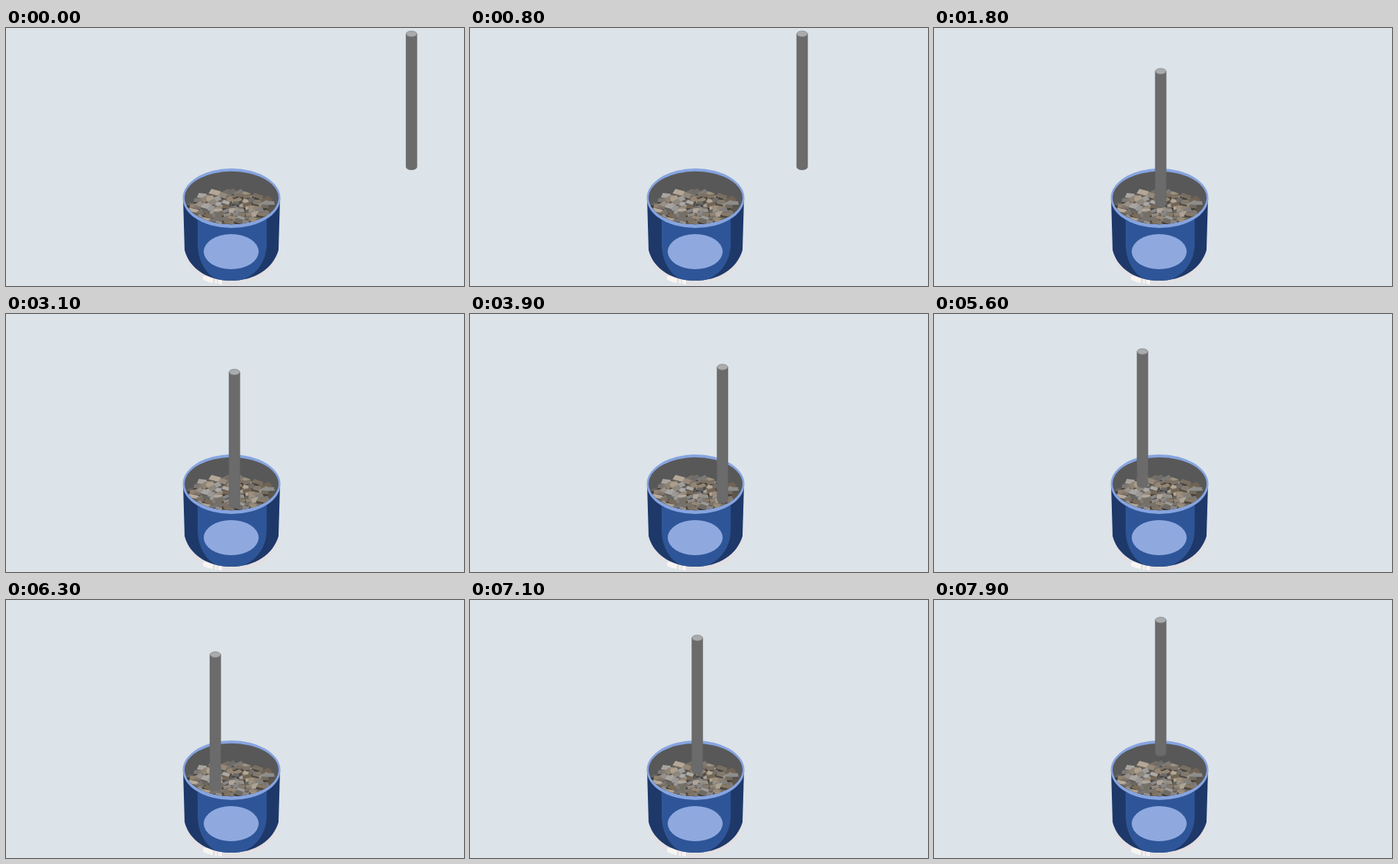
Write an HTML page that moves like this. It is 600 px wide and 338 px high and loops after 8 s.

```html
<!DOCTYPE html>
<html lang="en">
<head>
<meta charset="utf-8">
<title>Stirring rod</title>
<style>
  html, body { margin: 0; width: 100%; height: 100%; overflow: hidden; background: #dce3e9; }
  svg { display: block; width: 600px; height: 338px; }
</style>
</head>
<body>
<svg viewBox="0 0 600 338">
  <defs>
    <clipPath id="mouth"><ellipse cx="295.500" cy="222.500" rx="61.500" ry="34.700"/></clipPath>
    <clipPath id="wall"><path d="M232 223L234 291C240 315 264 331 295 331S350 315 357 291L359 223Z"/></clipPath>
  </defs>

  <path d="M236 298C238 322 266 337 293 337S353 325 357 298Z" fill="#e2e0e3"/>
  <path d="M258 325h13v9q-7-1-13-4zM274 328h2v7h-2zM278 328h5v8l-5-1z" fill="#f7f4f2"/>

  <g clip-path="url(#wall)">
    <rect x="230" y="220" width="132" height="114" fill="#1e3869"/>
    <path d="M251 240V285C252 308 264 326 282 332H302C326 327 341.500 307 341.500 283V240Z" fill="#2e5598"/>
  </g>
  <ellipse cx="295" cy="293" rx="36" ry="23" fill="#8fa9df"/>

  <ellipse cx="295.500" cy="223" rx="64" ry="39" fill="#86a4df"/>
  <ellipse cx="295.500" cy="222.500" rx="61.500" ry="34.700" fill="#585859"/>
  <g id="stones" clip-path="url(#mouth)">
    <ellipse cx="296" cy="237" rx="56" ry="21" fill="#5f574b"/>
  </g>

  <g id="rod">
    <path d="M-7.200 4.300V178.500A7.200 4 0 0 0 7.200 178.500V4.300Z" fill="#6b6b6c" stroke="#626263" stroke-width=".4"/>
    <ellipse cy="4.300" rx="7" ry="3.800" fill="#a9abac" stroke="#77797a" stroke-width=".6"/>
  </g>
</svg>
<script>
const LOOP = 8000, STEP = 100;
const stones = document.getElementById('stones');
const rod = document.getElementById('rod');

let seed = 41;
const rand = (a, b) => {
  seed = (seed * 16807) % 2147483647;
  return a + (b - a) * seed / 2147483647;
};

function polygon(points, fill) {
  const p = document.createElementNS('http://www.w3.org/2000/svg', 'polygon');
  p.setAttribute('points', points.map(q => q.map(v => v.toFixed(1)).join()).join(' '));
  p.setAttribute('fill', fill);
  stones.append(p);
}

// Each stone is a tilted slab: a lit top and a dark front, laid back to front.
function stone(x, y) {
  const w = rand(4, 7), h = rand(2, 3.8), tilt = rand(-.8, .8), depth = rand(2, 4);
  const tone = rand(98, 172), warm = rand(-1, 15);
  const shade = k => `rgb(${[warm, 0, -warm * 1.3].map(d => Math.round((tone + d) * k))})`;
  const at = (u, v) => [x + u * w - v * h * tilt, y + v * h + u * w * tilt * .6];
  const [a, b, c, d] = [at(-.9, -.8), at(.8, -1), at(1, .7), at(-1, .9)];
  const low = p => [p[0], p[1] + depth];
  polygon([d, c, low(c), low(d)], shade(.58));
  polygon([a, b, c, d], shade(1));
}

for (let y = 216; y < 259; y += 4.8) {
  const half = 53 * Math.sqrt(Math.max(0, 1 - ((y - 237) / 22.5) ** 2));
  for (let x = 296 - half; x <= 296 + half; x += 9) stone(x + rand(-3, 3), y + rand(-2, 2));
}

const clamp = u => Math.min(1, Math.max(0, u));
const ease = (t, from, to, p) => {
  const u = clamp((t - from) / (to - from));
  return u < .5 ? .5 * (2 * u) ** p : 1 - .5 * (2 - 2 * u) ** p;
};

// Time, x and top of the rod while it stirs and leaves.
const path = [
  [2100, 297, 52.5], [2500, 297, 60], [3000, 297, 71], [3500, 314, 71],
  [3900, 330.8, 65.3], [4150, 344, 60], [4400, 345, 52], [4750, 317, 46],
  [4900, 312.8, 45.7], [5300, 293, 43.5], [5700, 267, 46.5], [6000, 254, 57],
  [6300, 274.2, 67.3], [6600, 290, 67], [6800, 297, 66], [7550, 297, 22], [8000, 297, 22]
];

// Cubic Hermite curve through the path with tangents from the neighbours.
function along(t) {
  let i = 0;
  while (i < path.length - 2 && path[i + 1][0] <= t) i++;
  const a = path[i], b = path[i + 1], span = b[0] - a[0], u = (t - a[0]) / span;
  const slope = (j, k) => {
    if (j === 0 || j >= path.length - 2) return 0;
    const p = path[j - 1], q = path[j + 1];
    return (q[k] - p[k]) / (q[0] - p[0]);
  };
  return [1, 2].map(k =>
    a[k] + (b[k] - a[k]) * u * u * (3 - 2 * u) +
    span * u * (1 - u) * (slope(i, k) * (1 - u) - slope(i + 1, k) * u));
}

function pose(t) {
  if (t >= 2100) return along(t);
  return [531.2 - 234.2 * ease(t, 55, 1700, 2), 3.4 + 49.1 * ease(t, 1000, 1800, 2)];
}

const start = performance.now();
function draw(now) {
  const t = Math.floor(Math.max(0, now - start) % LOOP / STEP) * STEP;
  const [x, y] = pose(t);
  rod.setAttribute('transform', `translate(${x.toFixed(2)} ${y.toFixed(2)})`);
  requestAnimationFrame(draw);
}
draw(start);
</script>
</body>
</html>
```
